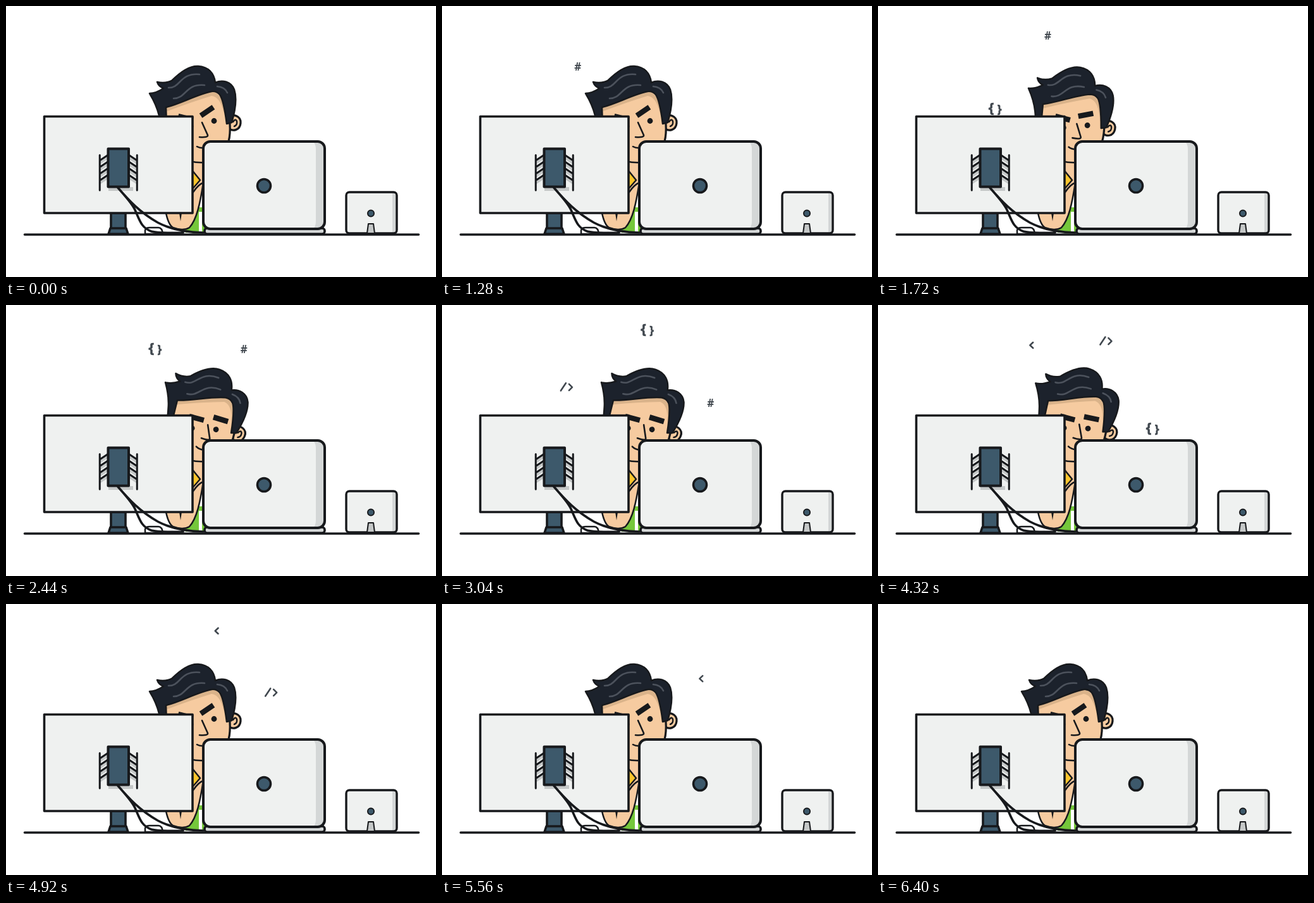
Animation of 680x428 px, one loop 6640 ms. Source, as an HTML page:

```html
<!DOCTYPE html>
<html lang="en">
<head>
<meta charset="utf-8">
<title>Developer at desk</title>
<style>
html, body { margin: 0; width: 100%; height: 100%; overflow: hidden; background: #fff; }
svg { display: block; width: 680px; height: 428px; }
.ink { stroke: #17191c; stroke-linecap: round; stroke-linejoin: round; }
.line { fill: none; }
.skin { fill: #f6cba0; }
.panel { fill: #eff1f0; }
.steel { fill: #3d596b; }
.shade { fill: #d4d7d7; }
.dark { fill: #17191c; }
.shine { fill: none; stroke: #4c525c; stroke-width: 2.6; stroke-linecap: round; }
.code { fill: #41484f; font: 700 17px "Open Sans", Inter, sans-serif; text-anchor: middle; }
.code .brace { stroke: #41484f; stroke-width: .6; }
.code .big { font-size: 22px; }
.code path { fill: none; stroke: #41484f; stroke-width: 2.6; stroke-linecap: round; stroke-linejoin: round; }
</style>
</head>
<body>
<svg viewBox="0 0 680 428">
  <!-- body and arm -->
  <path class="skin" d="M280 225H318V300H280Z"/>
  <path fill="#75c73b" d="M284 318H316V358H284Z"/>
  <path fill="#fff" d="M305 325H310V358H305Z"/>
  <path class="ink" fill="#fcc52c" stroke-width="2.5" d="M285 248L307 275L293 291Z"/>
  <path class="skin ink" stroke-width="2.5" d="M252 322Q256 345 264 350Q280 356 290 350C302 337 307 311 312 279Q304 282 296 294L270 315Z"/>
  <path class="dark" d="M274 327H278L276 340Z"/>

  <g id="head">
    <path class="skin ink" stroke-width="3.2" d="M352 176C359 169 372 174 371 185C370 196 359 199 352 193Z"/>
    <path class="ink line" stroke-width="2.5" d="M359 183Q363 177 365 182Q366 188 361 190"/>
    <path class="skin" d="M250 152L326 130L347 150L354 188V210Q350 240 310 245Q262 244 251 205Z"/>
    <path fill="#dab38a" d="M252 160Q292 147 325 135Q339 136 344 158L347 176L342 160Q336 143 325 142Q292 152 253 167Z"/>
    <path class="ink line" stroke-width="3.2" d="M354 186Q355 202 352 214Q347 232 335 240"/>
    <path class="ink line" stroke-width="2.6" d="M310 184L319 204Q320 208 306 207M302 222Q307 225 315 224"/>
    <g id="eyes" class="dark"><circle cx="329" cy="181.5" r="4.4"/><circle cx="292" cy="190" r="4.4"/></g>
    <path id="brow" class="dark" d="M-12 -4.2H12V4.2H-12Z"/>
    <path id="farBrow" class="dark" d="M-12 -4.2H12V4.2H-12Z"/>
    <path class="ink" fill="#1c222c" stroke-width="2.5" d="M239 120Q251 123 262 118C276 104 290 94 304 95C320 96 329 106 331 121C342 116 356 119 361 132C366 147 362 167 357 184L349 186C347 170 343 147 338 140Q333 134 325 135C301 140 277 154 253 160L255 215H250Q245 186 242 173Q238 156 227 138Q237 138 249 130Q241 127 239 120Z"/>
    <path class="shine" d="M257 129C276 130 275 105 306 108M265 146C285 146 284 122 314 125M334 127Q346 128 350 137"/>
  </g>
  <path class="ink line" stroke-width="2.6" d="M290 245Q304 248 314 247"/>

  <g class="code">
    <g class="glyph"><text y="6">#</text></g>
    <g class="glyph brace"><text class="big" x="-6" y="5">{</text><text x="7" y="6">}</text></g>
    <g class="glyph"><path d="M-9 6L-1 -6M4 -4.5L9 .5L4 5.5"/></g>
    <g class="glyph"><path d="M2.4 -4.5L-2.4 0L2.4 4.5"/></g>
  </g>

  <!-- desk mouse, monitor, cables -->
  <path class="ink" fill="#fff" stroke-width="2.5" d="M220 360V354Q221 350 227 350H241Q247 350 248 360Z"/>
  <g class="ink steel" stroke-width="3.6">
    <path d="M166 327H189V352H166Z"/>
    <path d="M165 351H190L193 360H162Z"/>
  </g>
  <path class="panel ink" stroke-width="3.6" d="M60.500 174.500H295V327H60.500Z"/>
  <path fill="#c5c8c8" d="M162 286H201V292H162Z"/>
  <g id="bracket"></g>
  <path class="steel ink" stroke-width="4" d="M161.500 225.500H194V285.500H161.500Z"/>
  <path class="ink line" stroke-width="3.6" d="M177 287C190 302 199 311 204 322C212 340 214 350 230 356Q240 359 280 358M177 287C195 308 212 326 240 342Q268 357 312 358"/>

  <!-- laptop -->
  <rect class="shade ink" x="314" y="351" width="190" height="9" rx="4" stroke-width="3.6"/>
  <rect class="panel" x="312" y="214" width="192" height="138" rx="11"/>
  <path class="shade" d="M486 215Q490 218 490 226V340Q490 349 485 352H494Q504 351 504 341V226Q504 215 494 214Z"/>
  <rect class="ink line" x="312" y="214" width="192" height="138" rx="11" stroke-width="4"/>
  <circle class="steel ink" cx="408" cy="284" r="10.500" stroke-width="3.6"/>

  <!-- tablet -->
  <rect class="panel" x="538" y="294" width="80" height="65" rx="5"/>
  <path class="shade" d="M611 295H614Q618 295 618 300V353Q618 359 613 359H611Z"/>
  <rect class="ink line" x="538" y="294" width="80" height="65" rx="5" stroke-width="3.4"/>
  <circle class="steel ink" cx="577" cy="327.500" r="5" stroke-width="2"/>
  <path class="ink" fill="#c5c8c8" stroke-width="2" d="M573 344H581L583 359H571Z"/>
  <path class="ink" stroke-width="3.6" d="M29.500 361H652.500"/>
</svg>
<script>
const LOOP = 6640;
const find = id => document.getElementById(id);
const glyphs = [...document.querySelectorAll(".glyph")];
const delays = [0, 960, 2000, 2785];
const clamp = (v, lo, hi) => Math.min(hi, Math.max(lo, v));
const place = (el, x, y, angle = 0) =>
  el.setAttribute("transform", `translate(${x} ${y}) rotate(${angle})`);

function ease(t, start, length) {
  const u = clamp((t - start) / length, 0, 1);
  return u * u * (3 - 2 * u);
}

function buildBracket() {
  let slats = "", shadows = "";
  for (const side of [-1, 1]) {
    const pole = 177.75 + side * 29.5, inner = 177.75 + side * 16;
    slats += `M${pole} 235.500V291`;
    for (let y = 244; y < 285; y += 10.5) {
      slats += `M${pole} ${y}L${inner} ${y - 9}`;
      shadows += `M${pole} ${y + 4}L${inner} ${y - 5}`;
    }
  }
  find("bracket").innerHTML =
    `<path d="${shadows}" fill="none" stroke="#c5c8c8" stroke-width="4"/>` +
    `<path d="${slats}" class="ink line" stroke-width="3"/>`;
}

// Glyphs follow an elliptical arc from the monitor to the laptop.
function moveGlyph(glyph, d) {
  const core = clamp(d, -1000, 1000);
  const degrees = 92.5 + 0.069 * core - 0.9e-8 * core ** 3 + 0.037 * (d - core);
  const a = clamp(degrees, 0, 180) * Math.PI / 180;
  place(glyph, 306 - 132 * Math.cos(a), 247 - 209 * Math.sin(a));
}

function render(t) {
  const turn = ease(t, 1400, 680) - ease(t, 4190, 660);
  find("head").setAttribute("transform", `rotate(${16 * turn} 296 219)`);
  place(find("eyes"), -4.5 * turn, 6 * turn);
  place(find("brow"), 318 + 9.3 * turn, 166.5 + 3.6 * turn, -34 + 35 * turn);
  place(find("farBrow"), 284 + 6 * turn, 177 + 2 * turn, 14 - 15 * turn);
  glyphs.forEach((glyph, i) => moveGlyph(glyph, t - 2000 - delays[i]));
}

function tick() {
  render(performance.now() % LOOP);
  requestAnimationFrame(tick);
}

buildBracket();
tick();
</script>
</body>
</html>
```
